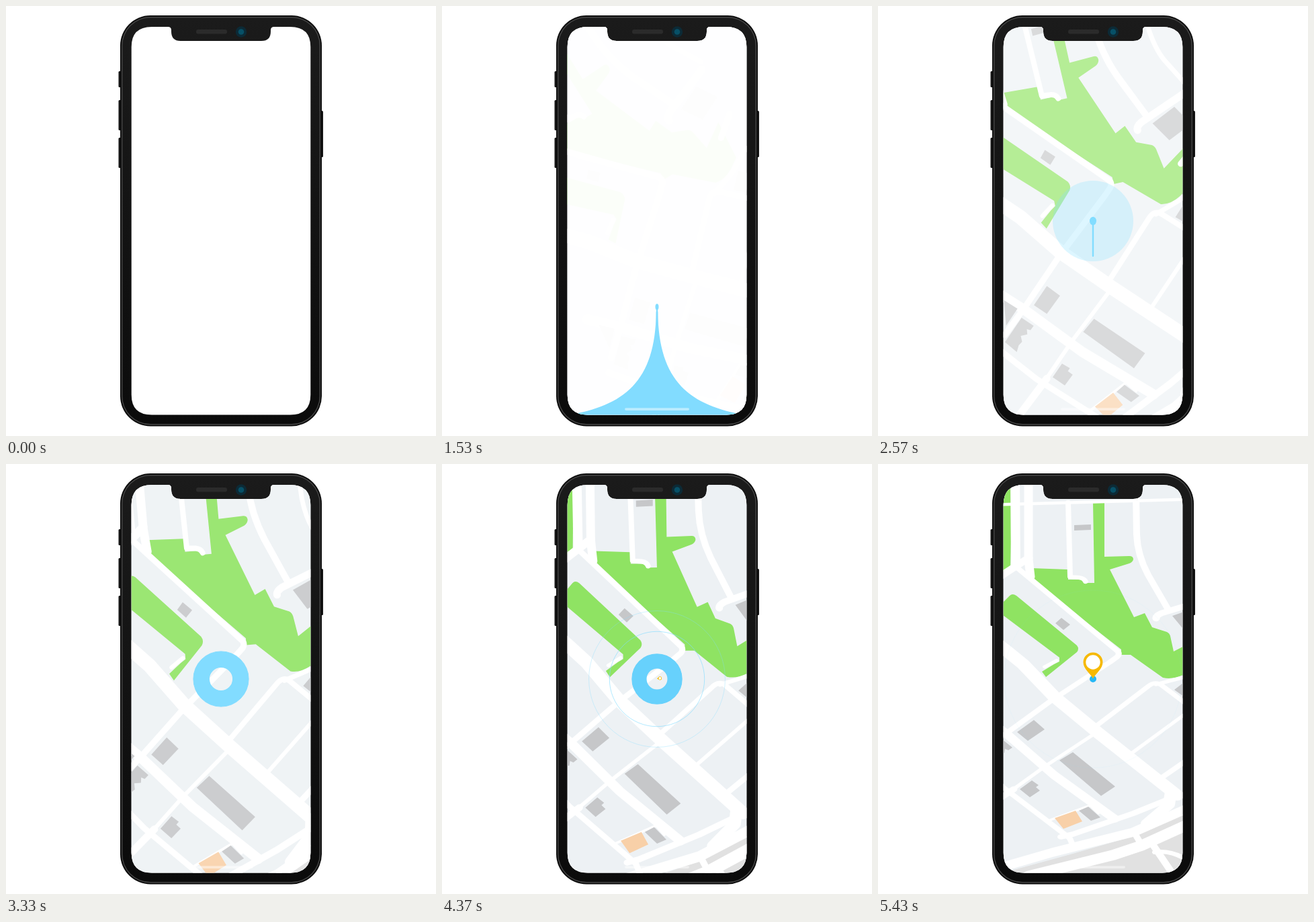
Animation, 640 px wide and 640 px high, one loop 7.06 s. Source, as an HTML page with a canvas:

```html
<!DOCTYPE html>
<html lang="en">
<head>
<meta charset="utf-8">
<title>Phone map locator</title>
<style>
  html, body { margin: 0; width: 100%; height: 100%; overflow: hidden; background: #fff; }
  canvas { display: block; width: 100vw; height: 100vh; }
</style>
</head>
<body>
<canvas id="stage" width="640" height="640"></canvas>
<script>
const ctx = document.getElementById('stage').getContext('2d');
const LOOP = 7.06, C = 320, MAX_TILT = 40 * Math.PI / 180;
const WHITE = '#fff', LAND = '#edf1f4', PARK = '#8fe362', BUILDING = '#c6c7c9', RAIL = '#e1e1e1';
const WATER = [130, 220, 255], MARKER = [38, 184, 245];

const clamp = v => Math.min(1, Math.max(0, v));
const span = (t, from, to) => clamp((t - from) / (to - from));
const cubicOut = p => 1 - (1 - p) ** 3;
const quadOut = p => 1 - (1 - p) ** 2;
const quadInOut = p => p < .5 ? 2 * p * p : 1 - 2 * (1 - p) ** 2;
const mix = (a, b, p) => a + (b - a) * p;
const rgb = (c, alpha = 1) => `rgba(${c.join()},${alpha})`;

// Map paths are written as seen tilted on the stage, then flattened around the centre.
const flatten = new DOMMatrix().scale(1, 1 / Math.cos(MAX_TILT)).translate(-C, -C);
function flat(d) {
  const path = new Path2D();
  path.addPath(new Path2D(d), flatten);
  return path;
}

const areas = [
  [RAIL, 'M100 632L290 580 370 557 453 522 560 470V760H100Z'],
  [PARK, 'M228 155L283 157V172H302L308 177H322L320 57H337V138L374 137Q380 137 380 142Q379 146 374 148L345 157 381 228 397 222 408 243 430 250Q434 252 435 256L440 279 475 261 470 306 454 314Q438 321 424 318L376 284H362V276L231 174Z'],
  [PARK, 'M196 196Q200 192 206 196L296 270Q300 275 296 280L250 317 244 309 262 298 270 294V288L186 225Q182 215 187 205Z'],
  [PARK, 'M165 40L200 36 197 155 165 170Z']
].map(([color, d]) => [color, flat(d)]);

const roads = [
  [14, 'M204 20L205 152'],
  [13, 'M224 20V142L227 168'],
  [13, 'M160 182L190 162 224 140'],
  [9, 'M209 156L357 279Q360 283 356 287L345 295 258 352 192 400 155 425'],
  [21, 'M150 246L190 277 216 298 262 346 325 398 445 493'],
  [15, 'M155 374L193 403 262 463 352 528'],
  [9, 'M140 438L187 482 283 555'],
  [6, 'M320 403L250 449 196 488'],
  [11, 'M202 484L141 524'],
  [8, 'M322 392L402 331Q413 322 423 330L480 373'],
  [7, 'M414 328L453 318 490 303'],
  [6, 'M374 433L490 348'],
  [9, 'M422 467L490 420'],
  [10, 'M272 555L290 551 380 520 432 499'],
  [18, 'M436 488L433 507 400 535'],
  [4, 'M256 530L316 508 328 520'],
  [17, 'M150 610L260 578 380 548 480 504'],
  [20, 'M225 613L350 582 392 568 480 528'],
  [9, 'M284 554L292 572'],
  [10, 'M381 548L393 568'],
  [11, 'M408 565L442 615'],
  [8, 'M412 578Q434 574 460 589'],
  [6, 'M120 62L520 51'],
  [8, 'M283 57L286 168 299 169Q307 170 309 175'],
  [10, 'M384 45L385 105Q386 135 402 165L431 215'],
  [11, 'M414 230Q413 226 422 222L495 200'],
  [7, 'M458 53L463 123Q467 148 478 162L500 192'],
  [6, 'M266 292.5L248 302'],
  [9, 'M466 278L495 260']
].map(([width, d]) => [width, flat(d)]);

const buildings = [
  [BUILDING, 'M264 237L273 229 286 239 276 247Z'],
  [BUILDING, 'M270 441L290 429 353 480 332 494Z'],
  [BUILDING, 'M207 399L232 381 248 395 223 412Z'],
  [BUILDING, 'M211 484L229 471 239 478 235 481 241 486 226 496Z'],
  [BUILDING, 'M299 516L313 510 331 526 317 531Z'],
  ['#f8d0a8', 'M263 527L294 516 304 532 276 543Z'],
  [BUILDING, 'M438 226L475 213 494 236 457 249Z'],
  [BUILDING, 'M292 91L317 90V98L292 99Z'],
  [BUILDING, 'M441 336L462 320 475 330 455 346Z'],
  [BUILDING, 'M165 386L182 399 160 415Z'],
  [BUILDING, 'M185 410L200 422 194 426 189 424 188 430 178 430V437L172 440 167 447 153 433Z']
].map(([color, d]) => [color, flat(d)]);

const pin = new Path2D('M0 0C-3 -7 -14.5 -14 -14.5 -24.5A14.5 14.5 0 0 1 14.5 -24.5C14.5 -14 3 -7 0 0Z');
const screen = new Path2D('M217 31H241Q246 31 246 36V38Q246 52 260 52H380Q394 52 394 38V36Q394 31 399 31H423Q453.3 31 453.3 61V578.5Q453.3 608.5 423 608.5H217Q186.7 608.5 186.7 578.5V61Q186.7 31 217 31Z');

function fill(path, color) {
  ctx.fillStyle = color;
  ctx.fill(path);
}

function ellipse(x, y, rx, ry, color) {
  ctx.beginPath();
  ctx.ellipse(x, y, rx, ry, 0, 0, 2 * Math.PI);
  ctx.fillStyle = color;
  ctx.fill();
}

function ring(r, width, color) {
  ctx.beginPath();
  ctx.arc(C, C, r, 0, 2 * Math.PI);
  ctx.lineWidth = width;
  ctx.strokeStyle = color;
  ctx.stroke();
}

function box(x, y, w, h, r, color) {
  ctx.beginPath();
  ctx.roundRect(x, y, w, h, r);
  ctx.fillStyle = color;
  ctx.fill();
}

function drawMap(t) {
  const opacity = cubicOut(span(t, 1.49, 5));
  if (!opacity) return;
  const turn = -45 * (1 - cubicOut(span(t, 1.05, 5.43))) * Math.PI / 180;
  const tilt = MAX_TILT * cubicOut(span(t, 3.88, 5.43));
  ctx.fillStyle = LAND;
  ctx.fillRect(0, 0, 640, 640);
  ctx.save();
  ctx.translate(C, C);
  ctx.scale(1, Math.cos(tilt));
  ctx.rotate(turn);
  ctx.lineCap = ctx.lineJoin = 'round';
  for (const [color, path] of areas) fill(path, color);
  ctx.strokeStyle = WHITE;
  for (const [width, path] of roads) {
    ctx.lineWidth = width;
    ctx.stroke(path);
  }
  for (const [color, path] of buildings) fill(path, color);
  ctx.restore();
  ctx.fillStyle = `rgba(255,255,255,${1 - opacity})`;
  ctx.fillRect(0, 0, 640, 640);
}

function drawWater(t) {
  if (t < .37 || t > 2.7) return;
  const color = rgb(WATER);
  const rise = t < 1.53 ? span(t, .37, 1.53) : 1 - quadInOut(span(t, 1.53, 2.05));
  const y = h => 609 - h * rise;
  ctx.beginPath();
  ctx.moveTo(187, 609);
  ctx.bezierCurveTo(270, y(14), 318, y(49), 318.7, y(154));
  ctx.lineTo(321.3, y(154));
  ctx.bezierCurveTo(322, y(49), 370, y(14), 453, 609);
  ctx.fillStyle = color;
  ctx.fill();

  const head = mix(609, C, span(t, .37, 2.45));
  const tail = mix(609, C, span(t, 2, 2.7));
  if (tail > head) box(C - 1.2, head, 2.4, tail - head, 1.2, color);
  const grown = span(t, 1.53, 2.45);
  ellipse(C, head, mix(2.5, 5, grown), mix(4.5, 6.2, grown), color);
}

function drawMarker(t) {
  const splash = quadOut(span(t, 2.1, 2.57));
  const splashAlpha = .27 * (1 - span(t, 2.6, 3.1));
  if (splash && splashAlpha) ellipse(C, C, 60 * splash, 60 * splash, rgb(WATER, splashAlpha));

  for (const start of [3.32, 3.85]) {
    const age = t - start;
    if (age > 0 && age < 1.7) ring(40.5 + 58 * age, 1, rgb(WATER, .9 * (1 - age / 1.7)));
  }

  if (t >= 2.7) {
    const shrink = quadInOut(span(t, 3.87, 5.17));
    const size = quadOut(span(t, 2.73, 3.87)) * (1 - shrink);
    const outer = 5 + 46.5 * size, hole = 22 * size;
    const color = WATER.map((c, i) => Math.round(mix(c, MARKER[i], shrink)));
    ring((outer + hole) / 2, outer - hole, rgb(color));
  }

  const pop = cubicOut(span(t, 4.3, 5.4));
  if (!pop) return;
  ctx.save();
  ctx.translate(C, 319.5);
  ctx.rotate((1 - pop) * 100 * Math.PI / 180);
  ctx.scale(pop, pop);
  fill(pin, '#f6b900');
  ellipse(0, -24.5, 10.7, 10.7, WHITE);
  ctx.restore();
}

function drawPhone() {
  const buttons = [[167.5, 97, 24], [167.5, 140, 45], [167.5, 196, 45], [467, 156, 69]];
  for (const [x, y, h] of buttons) box(x, y, 5, h, 1.5, '#151515');
  const shade = ctx.createLinearGradient(0, 14, 0, 626);
  shade.addColorStop(0, '#1b1b1b');
  shade.addColorStop(1, '#0b0b0b');
  box(170, 14, 300, 611.5, 45, '#0d0d0d');
  box(172, 16, 296, 607.5, 43, '#454545');
  box(173.4, 17.4, 293.2, 604.7, 41.6, shade);
  fill(screen, WHITE);
  box(283, 35, 46, 6.5, 3, '#2b2b2b');
  ellipse(350, 38.5, 8.2, 8.2, '#0c2a36');
  ellipse(350, 38.5, 4.3, 4.3, '#075067');
}

function draw(t) {
  ctx.fillStyle = WHITE;
  ctx.fillRect(0, 0, 640, 640);
  drawPhone();
  ctx.save();
  ctx.clip(screen);
  drawMap(t);
  drawWater(t);
  drawMarker(t);
  box(272, 598.3, 96, 3.6, 1.8, 'rgba(255,255,255,.45)');
  ctx.restore();
}

const begin = performance.now();
function frame() {
  draw((performance.now() - begin) / 1000 % LOOP);
  requestAnimationFrame(frame);
}
frame();
</script>
</body>
</html>
```
